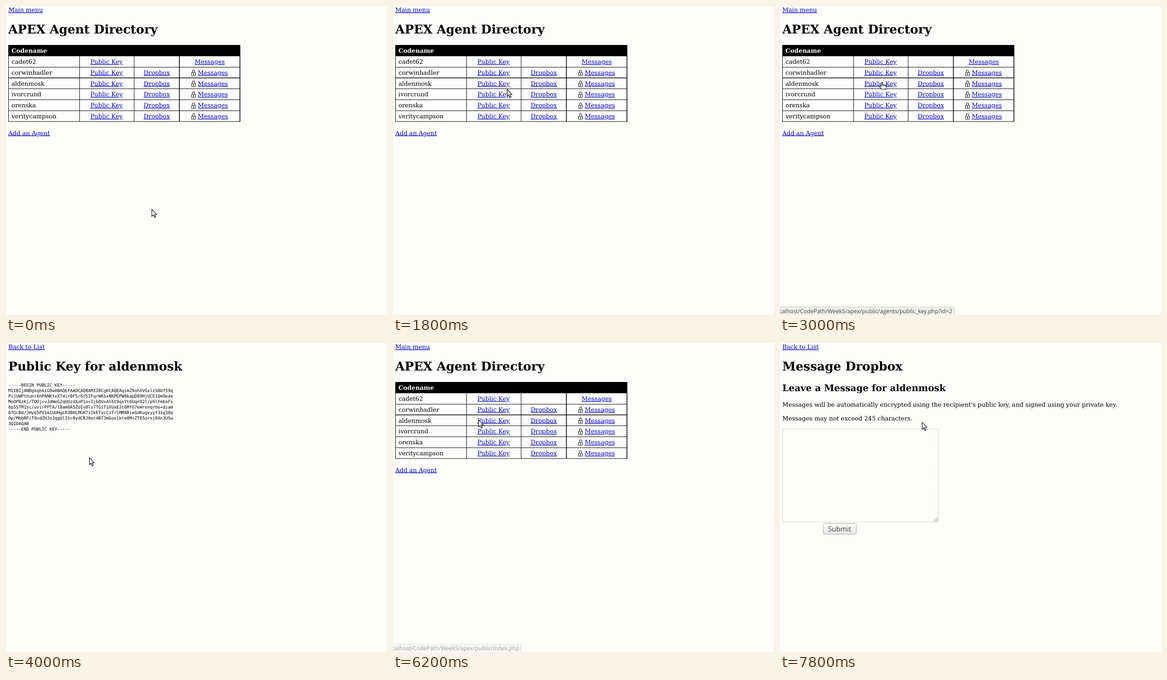
Write an HTML page that moves like this. It is 831 by 674 pixels and loops after 8 s.

```html
<!DOCTYPE html>
<html lang="en">
<head>
<meta charset="utf-8">
<title>Agent directory</title>
<style>
  html, body { margin: 0; width: 100%; height: 100%; overflow: hidden; background: #fdfdfb; }
  svg { display: block; width: 100vw; height: 100vh; }
  text { font: 13.2px "DejaVu Serif", serif; text-rendering: geometricPrecision; white-space: pre; }
  .link { fill: #0000cb; text-decoration: underline 1px; text-decoration-skip-ink: none; }
  .h1 { font-size: 26.45px; font-weight: bold; }
  .h2 { font-size: 20.05px; font-weight: bold; }
  .head { font-weight: bold; fill: #fdfdfb; }
  .mono { font: 9.344px "DejaVu Sans Mono", monospace; }
  .url { font: 12.3px "Open Sans", sans-serif; fill: #444; }
  .button { font: 15.4px "Open Sans", sans-serif; fill: #444; }
</style>
</head>
<body>
<svg viewBox="0 0 831 674">
  <defs>
    <linearGradient id="face" x2="0" y2="1">
      <stop stop-color="#fdfdfb"/><stop offset="1" stop-color="#e6e6e4"/>
    </linearGradient>
    <g id="lock" fill="none" stroke="#222">
      <path d="M2.5 6V3.2a2.5 2.7 0 0 1 5 0V6" stroke-width="1.1"/>
      <path d="M.5 6h9v6.5h-9z" fill="#eeeeec"/>
      <path d="M5 7.5v3.5" stroke-width="1.6"/>
    </g>
  </defs>
  <g id="list"></g>
  <g id="key"></g>
  <g id="dropbox"></g>
  <g id="status">
    <path id="bar" fill="#efefed" stroke="#c4c4bf"/>
    <text id="url" class="url" x="-12.4" y="670"></text>
  </g>
  <g id="cursor" fill="#fdfdfb" stroke="#1c1c1c" stroke-width="1.3" stroke-linejoin="round">
    <path id="arrow" d="M.5.5V16l3.5-3.2 2.6 5.8 2.5-1.1-2.6-5.6h4.6z"/>
    <path id="hand" d="M-2 9V1.5q0-1.3 1.5-1.3T1 1.5V5l5.5 1q2.5.5 2.5 3v5.8H-1.5L-5 10q-.3-2.5 1.5-2.2zM1 5v3M3.7 5.6v2.6M6.4 6v2.4"/>
  </g>
</svg>
<script>
const $ = id => document.getElementById(id);
const text = (x, y, str, cls = "") => `<text x="${x}" y="${y}" class="${cls}">${str}</text>`;
const link = (x, y, str) => text(x, y, str, "link");
const line = (d, width = 1) => `<path d="${d}" stroke="#000" stroke-width="${width}"/>`;

const agents = ["cadet62", "corwinhadler", "aldenmosk", "ivorcrund", "orenska", "veritycampson"];
const recipient = agents[2];

const keyLines = `-----BEGIN PUBLIC KEY-----
MIIBIjANBgkqhkiG9w0BAQEFAAOCAQ8AMIIBCgKCAQEAqimZ9ohXVGxlzSBUf59q
PzjUWPthuhrAhPANKtxX7dir0FS/6Y5IFqrWKSxNKPEPW8kapD89HjUCE1Qm9eak
MoOP0zKj/TDOjvvJdWeG2qUUzdXoP1o+IjbQU+At6t9qsYt6Uqn92l/p9lFmbsFs
8p5STM1sc/uvirPPTA/l8amOA5ZUIvBli7TGiT1XUxEJt6MfO7eWrsnqrbo+diam
6fGcBd/JHyG5PV1m1UUHgLR3B0LMGH7iIkETvcCzTrlMM4RieGdKugvyyf31g30p
Op/MbbRFiT0sdZHJoJqgUlIhr0ydCBJ0et4BT3mGos1kte0M+ZTE5orxj0Xn3U5w
3QIDAQAB
-----END PUBLIC KEY-----`.split("\n");

const agentRow = (name, i) => {
  const y = 126 + 23.8 * i;
  const row = text(12, y, name) + link(184, y, "Public Key");
  return row + (i === 0
    ? link(411.5, y, "Messages")
    : link(300.3, y, "Dropbox") + link(418.3, y, "Messages") +
      `<use href="#lock" x="404" y="${y - 10.5}"/>`);
};

$("list").innerHTML =
  link(5, 13, "Main menu") + text(5, 60, "APEX Agent Directory", "h1") +
  `<path d="M5 85h506v24.5H5z"/>` + text(12, 102, "Codename", "head") +
  line("M5.5 85V252M160.5 109V252M279.5 109V252M5 133.5H511M5 180.5H511M5 204.5H511M5 228.5H511M5 252H511") +
  line("M378.2 109V252M510.3 85V252.5M5 156.7H511", 1.6) +
  agents.map(agentRow).join("") + link(5, 281.5, "Add an Agent");

$("key").innerHTML =
  link(5, 13, "Back to List") + text(5, 60, "Public Key for " + recipient, "h1") +
  keyLines.map((str, i) => text(5, 95 + 12 * i, str, "mono")).join("");

$("dropbox").innerHTML =
  link(5, 13, "Back to List") + text(5, 60, "Message Dropbox", "h1") +
  text(5, 104.5, "Leave a Message for " + recipient, "h2") +
  text(5, 139, "Messages will be automatically encrypted using the recipient's public key, and signed using your private key.") +
  text(5, 168.5, "Messages may not exceed 245 characters.") +
  `<path d="M5.5 187.5h339.5v203H5.5z" fill="none" stroke="#aaaaa2" stroke-dasharray="1 1"/>
   <path d="M335 390l9.500-9.500M338.500 390l6-6M342 390l2.500-2.500" stroke="#777"/>
   <rect x="94.500" y="393.500" width="72" height="23.500" rx="3" fill="url(#face)" stroke="#aaa"/>` +
  text(104.5, 411, "Submit", "button");

// Each schedule is a list of [start time, ...values].
const pages = [[0, "list"], [3400, "key"], [5600, "list"], [7400, "dropbox"]];
const pointers = [
  [0, "arrow"], [2000, "hand"], [3600, "arrow"], [4800, "hand"],
  [6000, "arrow"], [6800, "hand"], [7400, "arrow"]
];
const statuses = [
  [0, "", 0, 0],
  [2200, "agents/public_key.php?id=2", 381, 1],
  [3400, "", 0, 0],
  [5000, "agents/index.php", 322, 1],
  [5600, "index.php", 279, 1],
  [6200, "index.php", 279, 0.5],
  [6400, "", 0, 0],
  [7000, "agents/dropbox.php?id=2", 370, 1],
  [7400, "", 0, 0]
];
const path = [
  [0, 317.5, 443], [600, 317.5, 443], [1800, 248.5, 181], [2200, 222.5, 166.5],
  [3400, 222.5, 166.5], [4000, 181.5, 249.5], [4200, 181.5, 249.5],
  [5000, 58.5, 8.5], [5800, 58.5, 8.5], [6200, 186, 167],
  [6900, 325, 166], [7200, 325, 166], [7400, 309.5, 172.5], [8000, 309.5, 172.5]
];

const current = (schedule, t) => schedule.findLast(entry => entry[0] <= t);

function position(t) {
  const next = path.findIndex(point => point[0] > t);
  const [t0, x0, y0] = path[next - 1], [t1, x1, y1] = path[next];
  const u = (t - t0) / (t1 - t0), eased = u * u * (3 - 2 * u);
  return [x0 + (x1 - x0) * eased, y0 + (y1 - y0) * eased];
}

function show(ids, active) {
  for (const id of ids) $(id).style.display = id === active ? "" : "none";
}

function draw(now) {
  const t = Math.floor((now % 8000) / 200) * 200;
  show(["list", "key", "dropbox"], current(pages, t)[1]);
  show(["arrow", "hand"], current(pointers, t)[1]);

  const [, file, width, opacity] = current(statuses, t);
  $("status").setAttribute("opacity", opacity);
  $("url").textContent = "localhost/CodePath/Week5/apex/public/" + file;
  $("bar").setAttribute("d", `M-2 656.5H${width - 3.5}q3 0 3 3V676H-2z`);

  $("cursor").setAttribute("transform", `translate(${position(t)})`);
  requestAnimationFrame(draw);
}
requestAnimationFrame(draw);
</script>
</body>
</html>
```
